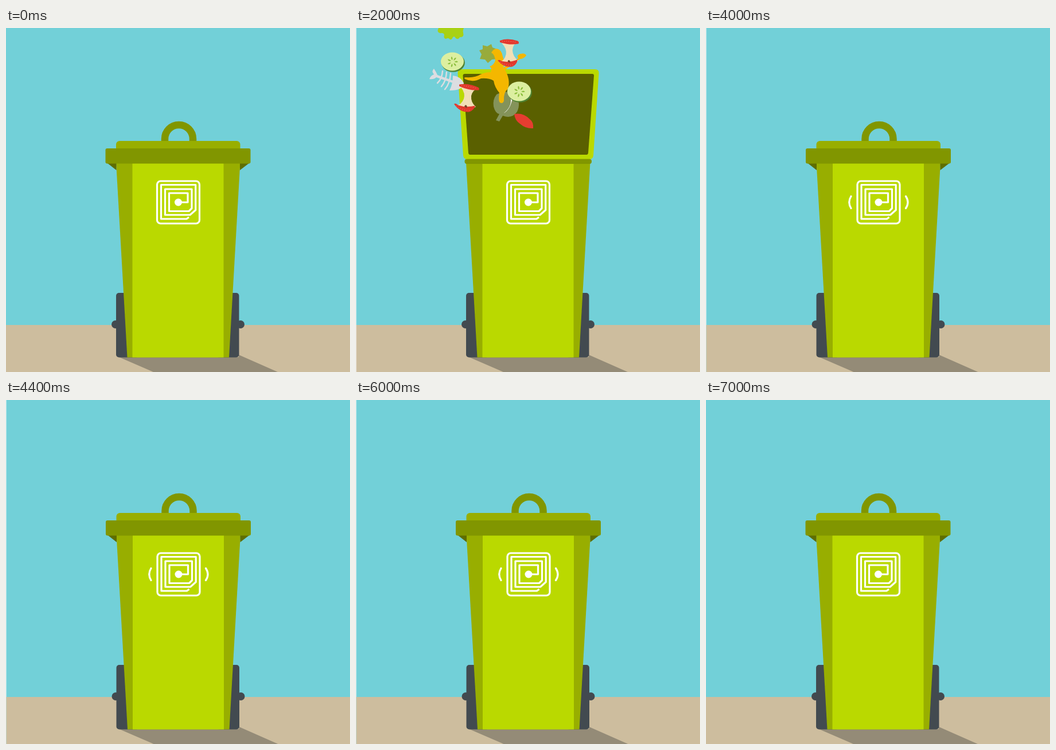
These frames come from a looping animation (600x600 px, 7.2 s). An HTML page without scripts:

```html
<!DOCTYPE html>
<html lang="en">
<head>
<meta charset="utf-8">
<title>Smart bin</title>
<style>
  html, body { margin: 0; width: 100%; height: 100%; overflow: hidden; background: #fff; }
  svg { display: block; width: 100vw; height: 100vh; }

  .shut, .open, .food, .signal { animation: 7200ms step-end infinite; }
  .shut { animation-name: shut; }
  .open { animation-name: open; }
  .food { animation-name: food; }
  .signal { animation-name: signal; }
  .blink { animation: blink 400ms step-end infinite; }

  @keyframes shut { 0% { opacity: 1 } 13.8889% { opacity: 0 } 41.6667%, 100% { opacity: 1 } }
  @keyframes open { 0% { opacity: 0 } 13.8889% { opacity: 1 } 41.6667%, 100% { opacity: 0 } }
  @keyframes food { 0% { opacity: 0 } 27.7778% { opacity: 1 } 41.6667%, 100% { opacity: 0 } }
  @keyframes signal { 0% { opacity: 0 } 55.5556%, 100% { opacity: 1 } }
  @keyframes blink { 0% { opacity: 1 } 50%, 100% { opacity: 0 } }

  .lime { fill: #bad900; }
  .side { fill: #98ae00; }
  .rim { fill: #819600; }
  .wheel { fill: #424a50; }
  .line { fill: none; stroke: #fff; stroke-width: 3.2; }
  .round { stroke-linecap: round; stroke-linejoin: round; }
</style>
</head>
<body>
<svg viewBox="0 0 600 600">
  <defs>
    <g id="slice">
      <ellipse cx="1" cy="1.5" rx="20.3" ry="16.3" fill="#4f8232"/>
      <ellipse cx="-.5" cy="-.5" rx="20" ry="16" fill="#dcefa0"/>
      <g id="seeds" fill="#8bbd3c">
        <path id="seed" d="M3 0Q7-3 9.5 0Q7 2 3 0"/>
        <use href="#seed" transform="rotate(52)"/>
        <use href="#seed" transform="rotate(104)"/>
        <use href="#seed" transform="rotate(156)"/>
        <use href="#seed" transform="rotate(208)"/>
        <use href="#seed" transform="rotate(260)"/>
        <use href="#seed" transform="rotate(310)"/>
      </g>
    </g>
    <g id="core">
      <path d="M-10-18Q-2-8-5 2Q-9 12-18 14Q-2 26 16 16Q7 8 8-3Q10-13 20-17Z" fill="#f1dfb6"/>
      <path d="M-13-23Q3-26 20-18Q23-16 21-13Q5-12-13-20Z" fill="#e2382d"/>
      <path d="M-22 11Q-19 9-15 13Q-1 18 15 14Q13 22 4 25Q-12 26-22 11Z" fill="#e2382d"/>
      <path d="M-18 14Q-8 23 6 22M-9-21Q6-20 17-16" fill="none" stroke="#f49a83" stroke-dasharray="1 3"/>
      <path d="M-4 15Q-1 10 1 16Q0 20-4 15Z" fill="#7b432b"/>
    </g>
  </defs>

  <g id="bin">
    <rect width="600" height="600" fill="#72d0d8"/>
    <rect y="518" width="600" height="82" fill="#cdbd9e"/>
    <path d="M197 574L257 600H474L406 570V574Z" fill="#948b77"/>
    <g class="wheel">
      <circle cx="191" cy="517" r="7"/>
      <circle cx="409" cy="517" r="7"/>
      <rect x="192" y="462" width="40" height="112.5" rx="5"/>
      <rect x="366" y="462" width="40.5" height="112.5" rx="5"/>
    </g>
    <path class="side" d="M192 234H408.5L389 574.5H211.500Z"/>
    <path class="lime" d="M220.500 234H379.500V574.500H220.500Z"/>
    <rect class="line" x="263.500" y="267" width="74" height="74" rx="6"/>
    <path class="line" stroke-linejoin="round" d="M301 304H317V288H284.500V319.500H319L324 314.500V281H277.500V326H321L330.700 317.500V273.500H270.500V333H315L319 330"/>
    <circle cx="300.500" cy="304" r="6.500" fill="#fff"/>
  </g>

  <g class="shut">
    <g id="lid">
      <path d="M176 235H192.500V248ZM408 248V235H425Z" fill="#5f6e00"/>
      <path d="M277 199V193.500A24.500 24.500 0 0 1 326 193.500V199" fill="none" stroke="#819600" stroke-width="12.500"/>
      <rect class="side" x="192" y="197" width="216.500" height="24" rx="6"/>
      <rect class="rim" x="173.500" y="210" width="253" height="26.500" rx="3"/>
    </g>
  </g>

  <g class="open">
    <rect width="1" height="600" fill="#fff" opacity=".5"/>
    <path class="lime" d="M184 72H417Q424 72 423.500 79L414 222Q413.500 229 407 229H194Q187.500 229 187 222L177.500 79Q177 72 184 72Z"/>
    <path d="M190 80H412Q415 80 415 83L405 218Q404.500 221 402 221H199Q196.500 221 196 218L186.500 83Q186.500 80 190 80Z" fill="#5a6000"/>
    <rect class="rim" x="189.500" y="228.500" width="221.500" height="8.500" rx="4"/>

    <g class="food">
      <path d="M144 0Q140 8 147 9Q153 8 154 12Q152 18 157 19Q161 16 164 20Q167 21 169 16Q172 13 174 18Q179 21 181 16Q189 17 187 8Q186 5 188 0Z" fill="#a8d114"/>
      <path d="M221 30L229 32L236 28L238 34L246 37L244 45L246 54L237 55L230 61L225 55L216 54L219 46L215 39L221 37Z" fill="#98ab3c"/>
      <path d="M245 116Q238 125 240 137Q243 149 250 150L244 161L250 163L256 153Q272 159 281 146Q288 131 279 119Q264 105 245 116Z" fill="#84935a"/>
      <path d="M270 122Q272 138 257 149Q269 143 273 122Z" fill="#fff"/>
      <path d="M276 150Q292 147 303 159Q310 164 309 175Q296 176 286 167Q277 161 276 150Z" fill="#e53d30"/>
      <path d="M245 36Q254 37 256 50Q260 60 257 69L283 53Q279 47 287 45Q295 43 297 48Q292 54 286 54L260 73Q270 91 265 106Q257 112 258 127Q256 133 251 130Q248 128 250 113Q242 104 240 92Q232 87 218 88Q204 96 190 89Q187 86 192 86Q208 87 217 81Q226 77 235 77Q238 70 233 67Q240 65 243 57Q242 46 236 43Q239 37 245 36Z" fill="#f4b700"/>
      <g fill="#dcdde1">
        <path d="M128 89Q131 82 136 81Q131 75 136 71Q140 77 142 82L170 92L169 96L140 86Q136 90 128 89Z"/>
        <path d="M169 83Q182 84 188 96Q187 109 163 109Q169 98 169 83Z"/>
        <path class="round" d="M151 75Q150 89 142 96M158 77Q157 93 149 102M165 79Q164 97 155 107" fill="none" stroke="#dcdde1" stroke-width="2.500"/>
      </g>
      <use href="#slice" transform="translate(168.500 59)"/>
      <use href="#slice" transform="translate(285 111) scale(1.030 1.060)"/>
      <use href="#core" transform="translate(193 121.500)"/>
      <use href="#core" transform="translate(266 43) rotate(-8) scale(.93 1)"/>
    </g>
  </g>

  <g class="signal">
    <g class="blink">
      <rect width="600" height="600" fill="#fff"/>
      <use href="#bin" x=".5"/>
      <use href="#lid" x=".5"/>
      <path class="line round" d="M253 293.500Q246.500 304 253 314.500M348.500 293.500Q355.500 304 348.500 314.500"/>
    </g>
  </g>
</svg>
</body>
</html>
```
